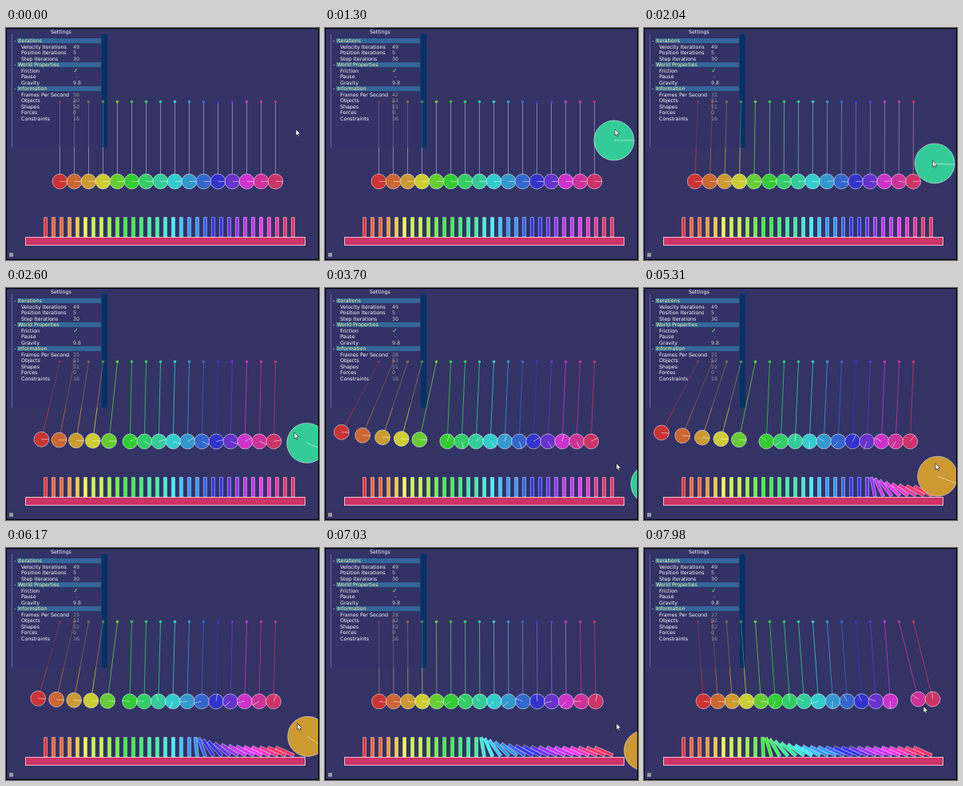
An HTML page with a canvas that plays this animation: 392 by 291 pixels, repeating every 8000 ms.

```html
<!DOCTYPE html>
<html lang="en">
<head>
<meta charset="utf-8">
<title>Physics sandbox</title>
<style>
  html, body { margin: 0; width: 100%; height: 100%; overflow: hidden; background: #333366; }
  canvas { position: absolute; left: 0; top: 0; }
  .shade { position: absolute; top: 8px; height: 142px; }
  #panel { left: 8px; width: 112px; background: rgba(51, 51, 102, .5); }
  #strip { left: 120px; width: 7px; background: rgba(0, 51, 102, .5); }
  #ui { position: absolute; left: 0; top: 0; font: 6.3px/8px "DejaVu Sans", sans-serif; color: #fff; }
  #ui span { position: absolute; white-space: pre; }
  #ui .bar { left: 14px; width: 105px; height: 6px; background: #336699; }
  #ui .head { color: #ffff99; }
  #ui .val { left: 84px; color: #ccc; }
  #ui .info { color: #999; }
  #ui .check { color: #66ff66; font-size: 8px; font-weight: bold; }
  #ui .dash { left: 87px; color: #9999cc; }
</style>
</head>
<body>
<canvas id="stage" width="392" height="291"></canvas>
<div id="panel" class="shade"></div>
<div id="strip" class="shade"></div>
<div id="ui"></div>
<script>
const LOOP = 8000;
const DROP1 = 330, HIT = 1940, DROP2 = 4150, BACK = 6970;
const FLOOR = 262, EDGE = 375, LIGHT = 'rgba(255,255,255,.65)';
const ctx = document.getElementById('stage').getContext('2d');
const ui = document.getElementById('ui');

const rgb = c => `rgb(${c.map(Math.round).join()})`;
const mix = (a, b, k) => a.map((v, i) => v + (b[i] - v) * k);
const clamp = u => Math.max(0, Math.min(1, u));
const ease = (t, from, to) => {
  const u = clamp((t - from) / (to - from));
  return u * u * (3 - 2 * u);
};

// Hue wheel snapped to steps of 51
function wheel(hue, lo, hi) {
  return [0, 240, 120].map(shift => {
    const level = clamp(Math.abs(((hue + shift) % 360) / 60 - 3) - 1);
    return Math.ceil((lo + (hi - lo) * level) / 51 - .5) * 51;
  });
}

function disc(x, y, r, angle, color) {
  ctx.beginPath();
  ctx.arc(x, y, r, 0, 2 * Math.PI);
  ctx.fillStyle = rgb(color);
  ctx.fill();
  ctx.moveTo(x, y);
  ctx.lineTo(x + r * Math.cos(angle), y + r * Math.sin(angle));
  ctx.strokeStyle = LIGHT;
  ctx.lineWidth = .8;
  ctx.stroke();
}

// Cradle: five bobs swing out to the left and return, then two leave on the right
function offset(t, i) {
  if (t < HIT) return 0;
  if (t > BACK) return (i > 13 ? 45.5 : 13.2) * Math.sin((t - BACK) * .00055);
  const u = (t - HIT) / (BACK - HIT);
  const swing = Math.sin(Math.PI * (u + .025 * Math.sin(2 * Math.PI * u)));
  return -swing * (i < 5 ? 51 * .82 ** i : 4.7);
}

function drawPendulums(t) {
  const turned = Math.max(0, t - HIT) * .0006;
  const bobs = Array.from({ length: 16 }, (_, i) => {
    const x = 67.5 + 18 * i, d = offset(t, i);
    const spin = i < 5 ? .03 : (i % 2 ? -1 : 1) * (.4 + .9 * Math.abs(Math.sin(i * 2.3)));
    return { x, d, bx: x + d, by: 93 + Math.sqrt(99.5 ** 2 - d * d), color: wheel(i * 22.5, 51, 204), angle: spin * turned };
  });
  for (const b of bobs) {
    ctx.beginPath();
    ctx.moveTo(b.x, 93);
    ctx.lineTo(b.bx, b.by);
    ctx.strokeStyle = rgb(mix([153, 153, 187], b.color, clamp(Math.abs(b.d))));
    ctx.lineWidth = .8;
    ctx.stroke();
    ctx.beginPath();
    ctx.arc(b.x, 92.5, 1.8, 0, 2 * Math.PI);
    ctx.fillStyle = rgb(b.color);
    ctx.fill();
  }
  for (const b of bobs) disc(b.bx, b.by, 9.4, b.angle, b.color);
}

// Each tile leans on the one to its left; only the front tile's tilt is free
function drawDominoes(t) {
  const W = 4, H = 24.5, GAP = 10, N = 32;
  const fallen = 7.8 * (Math.max(0, t - DROP2) / 1160) ** .835;
  const front = N - 1 - Math.floor(fallen);
  let tilt = 0;
  for (let i = 0; i < N; i++) {
    const lean = Math.asin(Math.max(0, GAP * Math.cos(tilt) - W) / H);
    if (i >= front) tilt += i === front ? lean * (fallen % 1) : lean;
    ctx.save();
    ctx.translate(47.5 + GAP * i + 2.5 * Math.sin(tilt) ** 2, FLOOR);
    ctx.rotate(-tilt);
    ctx.fillStyle = rgb(wheel(i * 360 / N, 51, 255));
    ctx.fillRect(0, -H, W, H);
    ctx.strokeStyle = 'rgba(255,255,255,.4)';
    ctx.lineWidth = 1;
    ctx.strokeRect(0, -H, W, H);
    ctx.restore();
  }
}

const fall = (y, dt) => y + 14 * (dt / 970) ** 2;

function drawGreenBall(t) {
  if (t < DROP1) return;
  const dt = Math.max(0, t - HIT);
  const x = 362 + .02 * dt + 3.5e-6 * dt * dt;
  const y = fall(127, Math.min(t, HIT) - DROP1) + .0425 * dt + 1.8e-6 * dt * dt;
  disc(x, y, 25, .00058 * dt, [51, 204, 153]);
}

// Drops onto the floor, then rolls over its right corner
function drawOrangeBall(t) {
  const dt = t - DROP2, R = 25.8;
  if (dt < 0) return;
  const x = 365 + 34.5 * (dt / 2880) ** 2.8;
  const over = Math.max(0, x - EDGE);
  const support = FLOOR - Math.sqrt(Math.max(0, R * R - over * over));
  disc(x, Math.min(fall(221, dt), support), 25, .00031 * dt, [204, 153, 51]);
}

function drawPointer(t) {
  const a = ease(t, 1450, 2350), b = ease(t, 2800, 3500), c = ease(t, 7100, 7900);
  ctx.save();
  ctx.translate(363 - 2 * a + 4 * b - 15 * c, 127 + 54 * a + 39 * b - 21.5 * c);
  ctx.fillStyle = '#fff';
  ctx.strokeStyle = '#111';
  ctx.lineWidth = .6;
  const arrow = new Path2D('M0 0V8L1.8 6.4 3 9.2 4.3 8.6 3.1 6 5.5 5.7Z');
  ctx.fill(arrow);
  ctx.stroke(arrow);
  ctx.restore();
}

function box(color, x, y, w, h) {
  ctx.fillStyle = color;
  ctx.fillRect(x, y, w, h);
}

function outline(color, x, y, w, h) {
  ctx.strokeStyle = color;
  ctx.lineWidth = 1;
  ctx.strokeRect(x + .5, y + .5, w - 1, h - 1);
}

function drawBackdrop() {
  box('#333366', 0, 0, 392, 291);
  box('#003366', 120, 8, 7, 142);
  box('#666699', 7, 8, 1, 142);
  box('#999999', 4, 282, 5, 5);
  box('#cc3366', 24, FLOOR, 351, 11);
  outline(LIGHT, 24, FLOOR, 351, 11);
}

function label(text, x, y, cls = '') {
  const el = document.createElement('span');
  el.textContent = text;
  el.className = cls;
  if (x !== null) el.style.left = x + 'px';
  el.style.top = y + 'px';
  return ui.appendChild(el);
}

const live = {};
const MENU = {
  'Iterations': { 'Velocity Iterations': 49, 'Position Iterations': 5, 'Step Iterations': 30 },
  'World Properties': { 'Friction': '✓', 'Pause': '-', 'Gravity': 9.8 },
  'Information': { 'Frames Per Second': '', 'Objects': '', 'Shapes': '', 'Forces': 0, 'Constraints': 16 }
};
const STYLE = { '✓': ' check', '-': ' dash' };

function buildMenu() {
  let y = 12;
  label('Settings', 56, 1);
  for (const [title, rows] of Object.entries(MENU)) {
    label('', null, Math.round(y + 1), 'bar');
    label('-', 10, y);
    label(title, 15, y, 'head');
    y += 7.5;
    for (const [name, value] of Object.entries(rows)) {
      const tone = title === 'Information' ? ' info' : STYLE[value] || '';
      label(name, 19, y);
      live[name] = label(value, null, y, 'val' + tone);
      y += 7.5;
    }
  }
}

function setText(name, value) {
  if (live[name].textContent !== String(value)) live[name].textContent = value;
}

// Frame rate falls as the scene gets busier
const RATES = [[500, 56], [1300, 42], [2600, 25], [3700, 26], [5310, 21], [7030, 28], [7980, 27]];
function rate(t) {
  let value = RATES[0][1];
  for (let i = 1; i < RATES.length; i++) {
    const [t0, v0] = RATES[i - 1], [t1, v1] = RATES[i];
    value += (v1 - v0) * clamp((t - t0) / (t1 - t0));
  }
  return Math.round(value);
}

function frame(t) {
  drawBackdrop();
  drawPendulums(t);
  drawDominoes(t);
  drawGreenBall(t);
  drawOrangeBall(t);
  drawPointer(t);
  outline('#000', 0, 0, 392, 291);
  const count = 50 + (t >= DROP1) + (t >= DROP2);
  setText('Frames Per Second', rate(t));
  setText('Objects', count);
  setText('Shapes', count);
}

buildMenu();
const start = performance.now();
function tick() {
  frame((performance.now() - start) % LOOP);
  requestAnimationFrame(tick);
}
tick();
</script>
</body>
</html>
```
